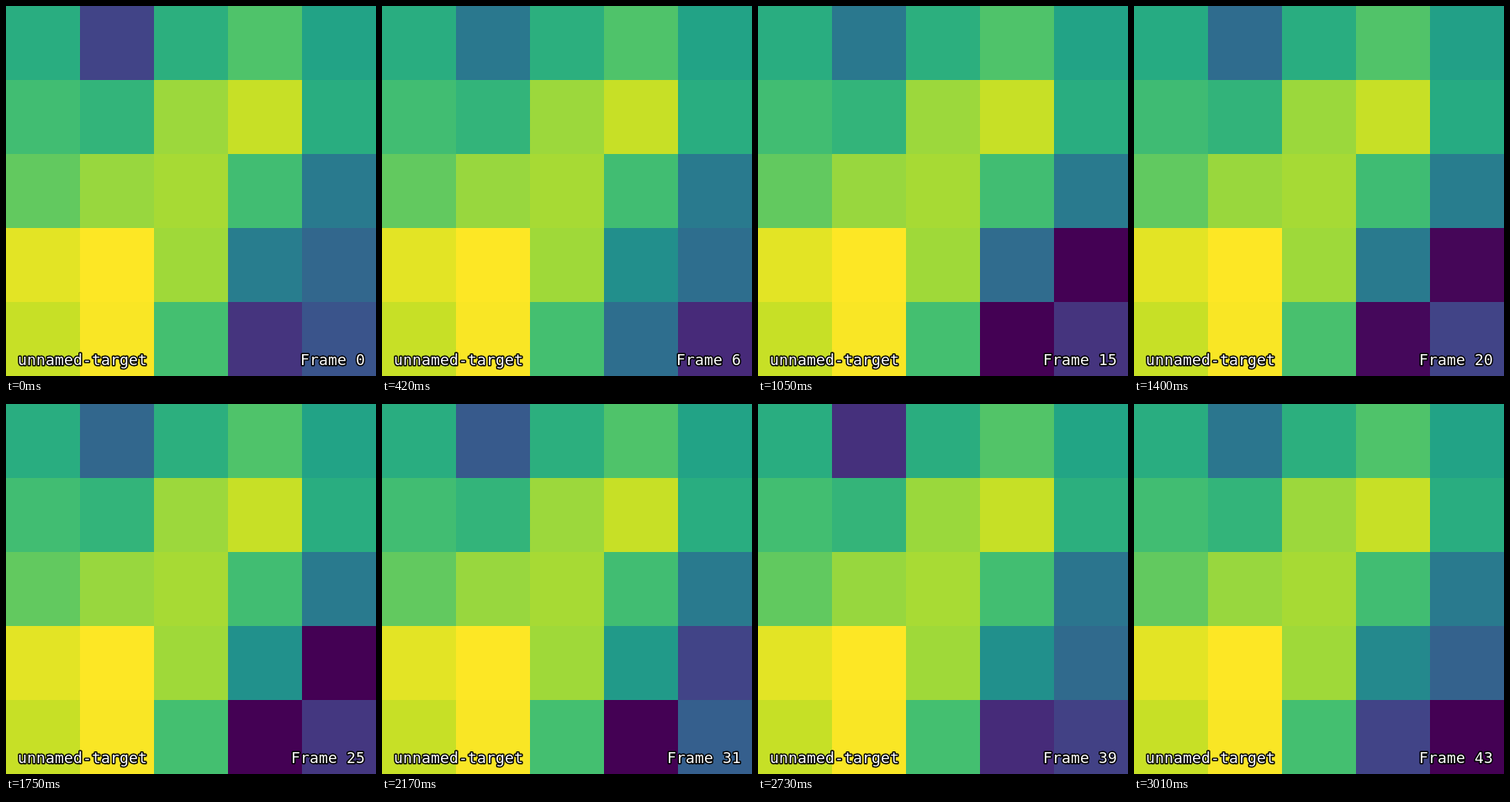
An HTML page with a canvas for the animation above (3.08 s loop, 440 by 440 pixels).

```html
<!DOCTYPE html>
<html lang="en">
<head>
<meta charset="utf-8">
<title>Heat map</title>
<style>
  html, body { margin: 0; width: 100%; height: 100%; overflow: hidden; background: #440154; }
  canvas { display: block; width: 440px; height: 440px; }
</style>
</head>
<body>
<canvas id="stage" width="440" height="440"></canvas>
<script>
const ctx = document.getElementById('stage').getContext('2d');
const SIZE = 440, GRID = 5, CELL = SIZE / GRID;
const STEP = 70, STEPS = 44, ADVANCE = 11;

// Colour ramp from low to high, evenly spaced stops
const ramp = ['#440154', '#482475', '#414487', '#355f8d', '#2a788e', '#21918c',
  '#22a884', '#44bf70', '#7ad151', '#bddf26', '#fde725']
  .map(hex => [1, 3, 5].map(i => parseInt(hex.slice(i, i + 2), 16)));

// Mean level of each cell in percent; higher levels are steadier
const means = [
  62, 32, 63, 72, 58,
  69, 65, 85, 91.5, 62,
  75.5, 84.5, 86.7, 69, 41,
  96, 100, 85.5, 47, 23,
  91.5, 99.3, 70, 10, 21
];

// The five restless cells pass through these levels at the key steps
const keys = [0, 6, 15, 25, 31, 36, 43];
const paths = {
  1: [20, 40, 40, 33, 28, 0, 39],
  18: [42, 49, 35, 50, 54, 48, 47],
  19: [33, 36, 0, 0, 20, 42, 31],
  23: [15, 36, 0, 0, 0, 0, 20],
  24: [26, 12, 15, 16, 30, 36, 0]
};

const mix = (a, b, u) => a + (b - a) * u;

// Seeded noise in -1..1
function noise(a, b) {
  const s = Math.sin(a * 12.9898 + b * 78.233) * 43758.5453;
  return (s - Math.floor(s)) * 2 - 1;
}

function level(id, n) {
  const i = Math.max(1, keys.findIndex(k => k >= n));
  const u = (n - keys[i - 1]) / (keys[i] - keys[i - 1]);
  const path = paths[id];
  const v = path ? mix(path[i - 1], path[i], u) : means[id];
  const swing = 8 * (1 - v / 100) ** 2 * Math.sin(Math.PI * u);
  return Math.min(100, Math.max(0, v + swing * noise(id + 1, n)));
}

function colour(v) {
  const p = v / 100 * (ramp.length - 1);
  const i = Math.min(ramp.length - 2, Math.floor(p));
  return `rgb(${ramp[i].map((c, k) => Math.round(mix(c, ramp[i + 1][k], p - i)))})`;
}

function label(text, x) {
  ctx.strokeText(text, x, 427);
  ctx.fillText(text, x, 427);
}

function draw(n) {
  means.forEach((_, id) => {
    ctx.fillStyle = colour(level(id, n));
    ctx.fillRect(id % GRID * CELL, Math.floor(id / GRID) * CELL, CELL, CELL);
  });
  ctx.font = '18px "DejaVu Sans Mono", monospace';
  ctx.letterSpacing = '0.16px';
  ctx.lineJoin = 'round';
  ctx.lineWidth = 3;
  ctx.strokeStyle = '#000';
  ctx.fillStyle = '#fff';
  label('unnamed-target', 14);
  const count = 'Frame ' + n;
  label(count, 427 - count.length * ADVANCE);
}

const start = performance.now();
function tick() {
  const t = Math.max(0, performance.now() - start);
  draw(Math.floor(t / STEP) % STEPS);
  requestAnimationFrame(tick);
}
tick();
</script>
</body>
</html>
```
